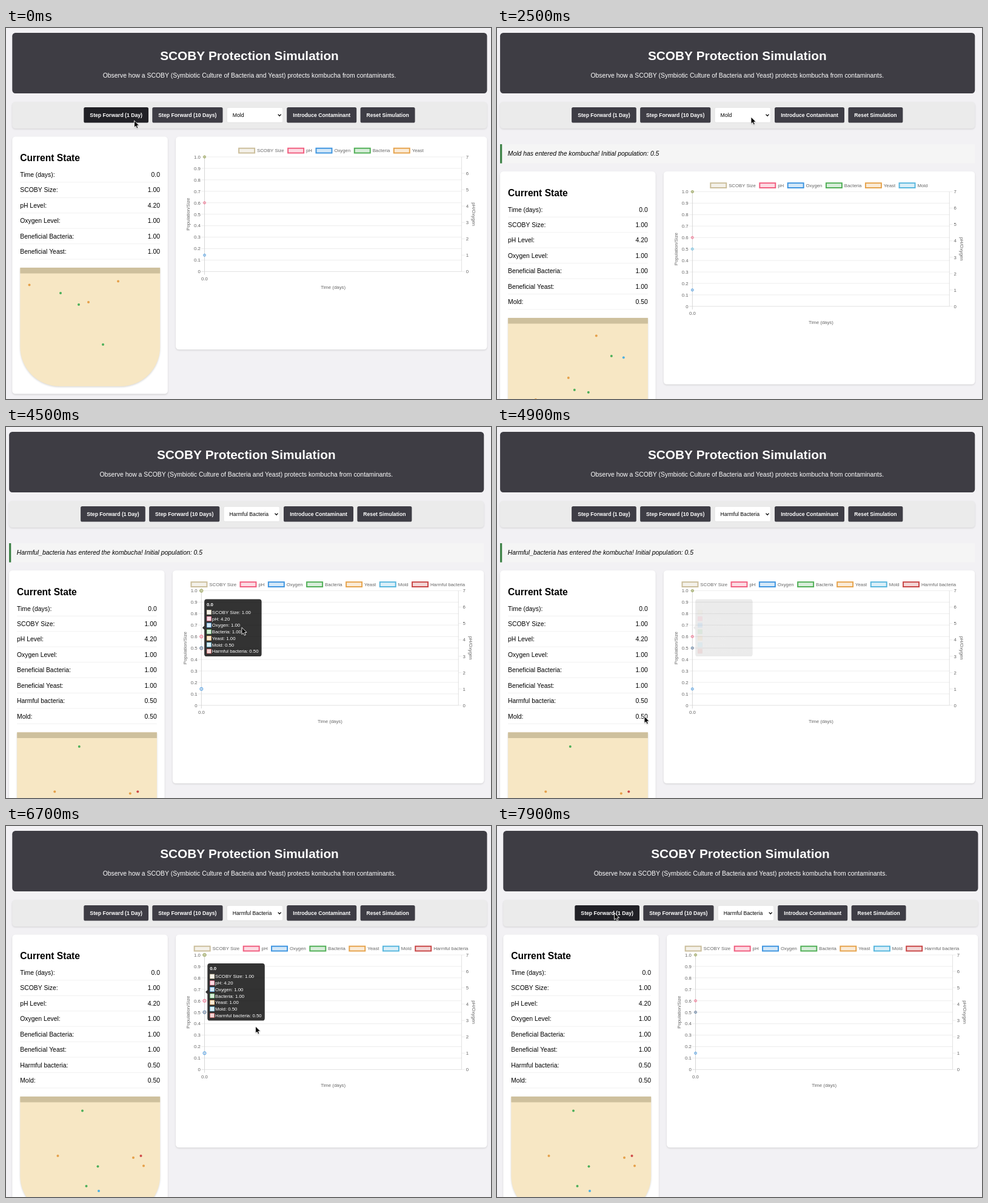
Recreate the animation shown at these times as an HTML page with a canvas. Size 800 by 613 pixels, loop 8000 ms.

```html
<!DOCTYPE html>
<html lang="en">
<head>
<meta charset="utf-8">
<title>SCOBY Protection Simulation</title>
<style>
html, body { margin: 0; width: 100%; height: 100%; overflow: hidden; background: #f2f1f4; }
canvas { display: block; }
</style>
</head>
<body>
<canvas id="stage" width="800" height="613"></canvas>
<script>
const ctx = document.getElementById('stage').getContext('2d');
const FONT = '"Liberation Sans", Arial, Helvetica, sans-serif';
const LOOP = 8000, MOLD_AT = 1000, HARM_AT = 3800, MESSAGE_END = 6000;

const GREEN = '#4caf5a', ORANGE = '#e5a04a', BLUE = '#4fb0e0', RED = '#cf4a48';
const SERIES = [
  { name: 'SCOBY Size', rgb: '203,190,155', value: 1, part: 1 },
  { name: 'pH', rgb: '241,94,127', value: 4.2, part: 0.6 },
  { name: 'Oxygen', rgb: '62,149,224', value: 1, part: 1 / 7 },
  { name: 'Bacteria', rgb: '80,175,86', value: 1, part: 1 },
  { name: 'Yeast', rgb: '230,163,76', value: 1, part: 1 },
  { name: 'Mold', rgb: '88,183,222', value: 0.5, part: 0.5, start: 949, from: MOLD_AT },
  { name: 'Harmful bacteria', rgb: '200,70,70', value: 0.5, part: 0.5, start: 3749, from: HARM_AT }
];

// dot positions relative to the vessel's top left corner
const DOTS = {
  clean: [[ORANGE, 15, 28.5, 161.5, 22.5, 112.5, 57], [GREEN, 66.5, 42, 96.5, 61, 136.5, 127]],
  mold: [[ORANGE, 145.5, 29.5, 99.5, 99, 45.5, 135], [GREEN, 170.5, 63, 109.5, 119, 132.5, 123],
    [BLUE, 190.5, 65.5]],
  both: [[ORANGE, 62, 98, 186.5, 101, 203.5, 114.5], [GREEN, 102.5, 23.5, 128, 115.5, 109, 148],
    [BLUE, 129.5, 156], [RED, 199, 98]]
};

// pointer stops: time, x, y
const PATH = [
  [0, 211.5, 153], [100, 230, 160], [400, 390, 182], [700, 503, 144], [1400, 503, 144],
  [2200, 419, 147], [2800, 419, 147], [3100, 414, 170], [3300, 425, 166], [3600, 508, 151],
  [3900, 508, 151], [4300, 440, 280], [4900, 243, 478], [5400, 205, 555], [5900, 190, 568],
  [6300, 230, 562], [6700, 411.5, 331], [7300, 405, 336], [7800, 193.5, 143.5], [8000, 193.5, 143.5]
];

const clamp = v => Math.max(0, Math.min(1, v));
const easeOut = p => 1 - (1 - clamp(p)) ** 4;
const fade = (t, on, off) => clamp(Math.min((t - on) / 200, 1 - (t - off) / 200));

function pointer(t) {
  const i = PATH.findIndex(p => p[0] > t);
  const [t0, x0, y0] = PATH[i - 1], [t1, x1, y1] = PATH[i];
  const p = (t - t0) / (t1 - t0), e = p * p * (3 - 2 * p);
  return [x0 + (x1 - x0) * e, y0 + (y1 - y0) * e];
}

function text(s, x, y, size, color = '#000', align = 'left', style = '') {
  ctx.font = `${style} ${size}px ${FONT}`;
  ctx.fillStyle = color;
  ctx.textAlign = align;
  ctx.fillText(s, x, y);
}

function rect(x, y, w, h, color, radius = 0, shadow = 0) {
  ctx.save();
  if (shadow) {
    ctx.shadowColor = `rgba(0,0,0,${shadow})`;
    ctx.shadowBlur = 3;
    ctx.shadowOffsetY = 1.3;
  }
  ctx.fillStyle = color;
  ctx.beginPath();
  ctx.roundRect(x, y, w, h, radius);
  ctx.fill();
  ctx.restore();
}

function line(x0, y0, x1, y1, color, width = 0.65) {
  ctx.strokeStyle = color;
  ctx.lineWidth = width;
  ctx.beginPath();
  ctx.moveTo(x0, y0);
  ctx.lineTo(x1, y1);
  ctx.stroke();
}

function shape(points, fill) {
  ctx.beginPath();
  points.forEach(([x, y]) => ctx.lineTo(x, y));
  ctx.closePath();
  ctx.fillStyle = fill;
  ctx.fill();
}

function header() {
  rect(10.3, 8, 783.2, 100, '#3e3d44', 5.2);
  text('SCOBY Protection Simulation', 401.5, 53.4, 20.8, '#fff', 'center', 'bold');
  text('Observe how a SCOBY (Symbiotic Culture of Bacteria and Yeast) protects kombucha from contaminants.',
    401.5, 82, 10.4, '#fff', 'center');
}

function button(label, x, w, mx, my) {
  const over = mx > x && mx < x + w && my > 131 && my < 157;
  rect(x, 131, w, 25.6, over ? '#212126' : '#3e3d45', 2.6);
  text(label, x + w / 2, 147, 8.667, '#fff', 'center', 'bold');
}

function controls(t, mx, my) {
  rect(10.3, 122, 783.2, 44, '#ebebeb', 5.2, 0.12);
  button('Step Forward (1 Day)', 128.3, 106.7, mx, my);
  button('Step Forward (10 Days)', 241.3, 116.2, mx, my);
  button('Introduce Contaminant', 463.2, 115, mx, my);
  button('Reset Simulation', 584.6, 90, mx, my);

  const focus = t >= 2700 && t < HARM_AT;
  rect(364.3, 131.3, 92.4, 25, '#fff', 2.6);
  ctx.strokeStyle = focus ? '#1768c4' : '#dcdcdc';
  ctx.lineWidth = focus ? 1.8 : 0.65;
  ctx.stroke();
  text(t < 3200 ? 'Mold' : 'Harmful Bacteria', 373.8, 147, 8.667);
  ctx.strokeStyle = '#000';
  ctx.lineWidth = 1.3;
  ctx.beginPath();
  ctx.moveTo(448.7, 142.6);
  ctx.lineTo(451.2, 145.2);
  ctx.lineTo(453.7, 142.6);
  ctx.stroke();
}

function message(name) {
  rect(10.3, 192, 783.2, 31.6, '#f5f5f5');
  rect(10.3, 192, 3.2, 31.6, '#3a8044');
  text(`${name} has entered the kombucha! Initial population: 0.5`, 23, 211.4, 10.4, '#000', 'left', 'italic');
}

function statePanel(t) {
  const rows = [['Time (days):', '0.0'], ['SCOBY Size:', '1.00'], ['pH Level:', '4.20'],
    ['Oxygen Level:', '1.00'], ['Beneficial Bacteria:', '1.00'], ['Beneficial Yeast:', '1.00']];
  if (t >= HARM_AT) rows.push(['Harmful bacteria:', '0.50']);
  if (t >= MOLD_AT) rows.push(['Mold:', '0.50']);
  const top = 396 + (rows.length - 6) * 25.45;

  rect(10.3, 179.6, 256.5, top + 29, '#fff', 5.2, 0.13);
  text('Current State', 23.2, 220, 15.6, '#000', 'left', 'bold');
  rows.forEach(([label, value], i) => {
    const y = 246 + i * 25.45;
    text(label, 23.2, y, 10.4);
    text(value, 254, y, 10.4, '#000', 'right');
    line(23.3, y + 8.8, 254, y + 8.8, '#e9e9e9');
  });

  rect(23.4, top, 230.7, 196, '#f7e7c4', [0, 0, 65, 65], 0.16);
  rect(23.4, top, 230.7, 9.6, '#cec09d');
  const set = t < MOLD_AT ? 'clean' : t < HARM_AT ? 'mold' : 'both';
  for (const [color, ...xy] of DOTS[set]) {
    for (let i = 0; i < xy.length; i += 2) {
      rect(21.5 + xy[i], top - 2 + xy[i + 1], 4, 4, color, 2);
    }
  }
}

function legend(items) {
  ctx.font = `7.8px ${FONT}`;
  const widths = items.map(s => 36.4 + ctx.measureText(s.name).width);
  let x = 536.5 - (widths.reduce((a, b) => a + b) - 6.5) / 2;
  items.forEach((s, i) => {
    ctx.fillStyle = `rgba(${s.rgb},.22)`;
    ctx.fillRect(x, 198.7, 26, 7.8);
    ctx.strokeStyle = `rgb(${s.rgb})`;
    ctx.lineWidth = 1.95;
    ctx.strokeRect(x, 198.7, 26, 7.8);
    text(s.name, x + 29.9, 205.4, 7.8, '#666');
    x += widths[i];
  });
}

function axisTitle(s, x, angle) {
  ctx.save();
  ctx.translate(x, 307.7);
  ctx.rotate(angle);
  text(s, 0, 2.8, 7.8, '#666', 'center');
  ctx.restore();
}

function tooltip(items, alpha) {
  ctx.save();
  ctx.globalAlpha = alpha;
  ctx.fillStyle = 'rgba(0,0,0,.8)';
  ctx.beginPath();
  ctx.roundRect(332.3, 227, 94.5, 94.6, 3.9);
  ctx.moveTo(332.3, 271);
  ctx.lineTo(329, 274.3);
  ctx.lineTo(332.3, 277.5);
  ctx.fill();
  text('0.0', 336.2, 238.3, 7.8, '#fff', 'left', 'bold');
  items.forEach((s, i) => {
    const y = 248.5 + i * 10.75;
    rect(336.2, y - 3.9, 7.8, 7.8, `rgb(${s.rgb})`);
    rect(336.8, y - 3.3, 6.6, 6.6, '#fff');
    rect(336.8, y - 3.3, 6.6, 6.6, `rgba(${s.rgb},.22)`);
    text(`${s.name}: ${s.value.toFixed(2)}`, 345, y + 2.8, 7.8, '#fff');
  });
  ctx.restore();
}

function chartPanel(t) {
  const L = 327.5, R = 751.5, T = 213, B = 402.4, H = B - T;
  const grid = '#e4e4e4', axis = '#d2d2d2';
  const items = SERIES.filter(s => !s.from || t >= s.from);
  rect(280, 179.6, 513.5, 351.6, '#fff', 5.2, 0.13);
  legend(items);

  for (let i = 0; i <= 10; i++) {
    const y = B - H * i / 10;
    line(L - 5.2, y, R, y, i ? grid : axis);
    text(i ? (i / 10).toFixed(1) : '0', 320.8, y + 2.8, 7.8, '#666', 'right');
  }
  for (let i = 0; i <= 7; i++) {
    const y = B - H * i / 7;
    line(R, y, R + 5.2, y, grid);
    text(i, 758.7, y + 2.8, 7.8, '#666');
  }
  line(L, T, L, B + 5.2, axis, 0.9);
  line(R, T, R, B, axis);
  text('0.0', L, 416.8, 7.8, '#666', 'center');
  text('Time (days)', 539.6, 431.2, 7.8, '#666', 'center');
  axisTitle('Population/Size', 300.3, -Math.PI / 2);
  axisTitle('pH/Oxygen', 771.7, Math.PI / 2);

  const alpha = Math.max(fade(t, 4250, 4720), fade(t, 6490, 7400));
  for (const s of [...items].reverse()) {
    const part = s.part * (s.start ? easeOut((t - s.start) / 1000) : 1);
    ctx.beginPath();
    ctx.arc(L, B - H * part, 1.95 + 0.65 * alpha, 0, 7);
    ctx.fillStyle = `rgba(${s.rgb},.25)`;
    ctx.fill();
    ctx.strokeStyle = `rgb(${s.rgb})`;
    ctx.lineWidth = 0.8;
    ctx.stroke();
  }
  if (alpha) tooltip(items, alpha);
}

function cursor(x, y, hand) {
  ctx.save();
  ctx.translate(x, y);
  ctx.lineJoin = 'round';
  ctx.shadowColor = 'rgba(0,0,0,.3)';
  ctx.shadowBlur = 2;
  ctx.shadowOffsetY = 1;
  if (hand) {
    shape([[-1, 0.6], [0, 0], [1.2, 0.8], [1.7, 4], [4, 4.2], [6.5, 5], [7.2, 6.5], [6.6, 9.5],
      [5.6, 12.5], [0.2, 12.5], [-3.6, 7.6], [-3, 6.6], [-1.8, 6.8], [-0.3, 7.8]], '#fff');
    ctx.shadowColor = 'transparent';
    ctx.strokeStyle = '#000';
    ctx.lineWidth = 0.9;
    ctx.stroke();
    for (const dx of [1.2, 3, 4.7]) line(dx, 8, dx + 0.2, 10.8, '#000', 0.6);
  } else {
    shape([[0, 0], [0, 11.4], [2.6, 9], [4.4, 13], [6.4, 12.1], [4.7, 8.2], [8.2, 8.1]], '#000');
    ctx.shadowColor = 'transparent';
    ctx.strokeStyle = '#fff';
    ctx.lineWidth = 0.9;
    ctx.stroke();
  }
  ctx.restore();
}

function draw(t) {
  const noted = t >= MOLD_AT && t < MESSAGE_END;
  const dx = noted ? -5.2 : 0;
  const [mx, my] = pointer(t);
  rect(0, 0, 800, 613, '#f2f1f4');
  ctx.save();
  ctx.translate(dx, 0);
  header();
  controls(t, mx - dx, my);
  if (noted) {
    message(t < HARM_AT ? 'Mold' : 'Harmful_bacteria');
    ctx.translate(0, 57.5);
  }
  statePanel(t);
  chartPanel(t);
  ctx.restore();
  cursor(mx, my, t >= 3500 && t < 4000);
}

// the screen refreshes ten times a second
function tick(now) {
  draw(Math.floor(now % LOOP / 100) * 100);
  requestAnimationFrame(tick);
}
requestAnimationFrame(tick);
</script>
</body>
</html>
```
